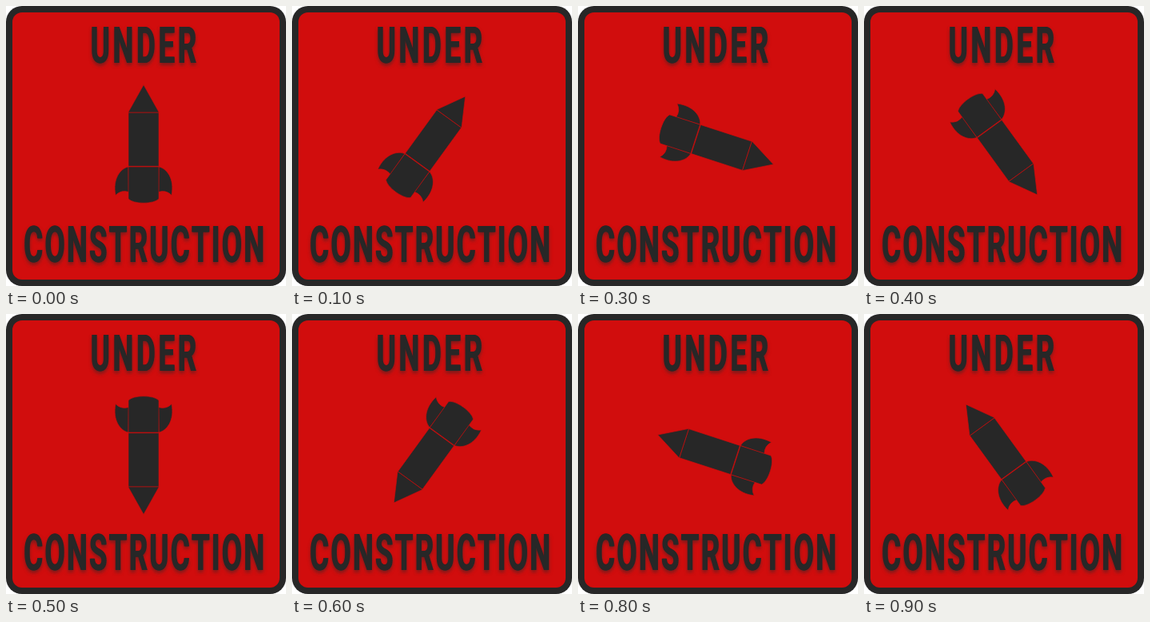
Recreate the animation shown at these times as an HTML page. Size 350 by 350 pixels, loop 1000 ms.

```html
<!DOCTYPE html>
<html lang="en">
<head>
<meta charset="utf-8">
<title>Under construction</title>
<style>
  :root { --ink: #272727; --red: #d10d0d; }
  html, body { margin: 0; width: 100%; height: 100%; overflow: hidden; background: #fff; }
  svg { display: block; overflow: hidden; fill: var(--ink); }
  #rocket { stroke: var(--red); stroke-width: .6; }
  /* condensed lettering: narrowed face, stems thickened sideways, soft shadow below */
  #words {
    font: bold 63.3px Roboto, "Liberation Sans", sans-serif;
    font-kerning: none;
    text-anchor: middle;
    filter: drop-shadow(1.6px 0 0 #272727) drop-shadow(0 3px 2px rgba(39, 39, 39, .5));
  }
</style>
</head>
<body>
<svg width="350" height="350" viewBox="0 0 350 350">
  <rect width="350" height="350" rx="20"/>
  <rect x="8" y="8" width="334" height="334" rx="12" fill="#d10d0d"/>
  <g id="rocket">
    <path id="fin" d="M153 201C143 203 133 216 137 236.500Q144 229.500 153.500 232.500Z"/>
    <use href="#fin" transform="matrix(-1 0 0 1 344 0)"/>
    <path d="M153 201H191V241C185 248 159 248 153 241Z"/>
    <path d="M153 133H191V200.300H153Z"/>
    <path d="M172 98.500L191.300 133H152.700Z"/>
  </g>
  <g id="words">
    <g transform="translate(173.3 0) scale(.577 1)">
      <text y="71.500" letter-spacing="6.5">UNDER</text>
      <text y="320.500" letter-spacing="4">CONSTRUCTION</text>
    </g>
  </g>
</svg>
<script>
  const rocket = document.getElementById("rocket");
  const STEP = 100, STEPS = 10;

  function frame() {
    const step = Math.floor(performance.now() / STEP) % STEPS;
    rocket.setAttribute("transform", `rotate(${step * 360 / STEPS} 172 174.5)`);
    requestAnimationFrame(frame);
  }
  frame();
</script>
</body>
</html>
```
